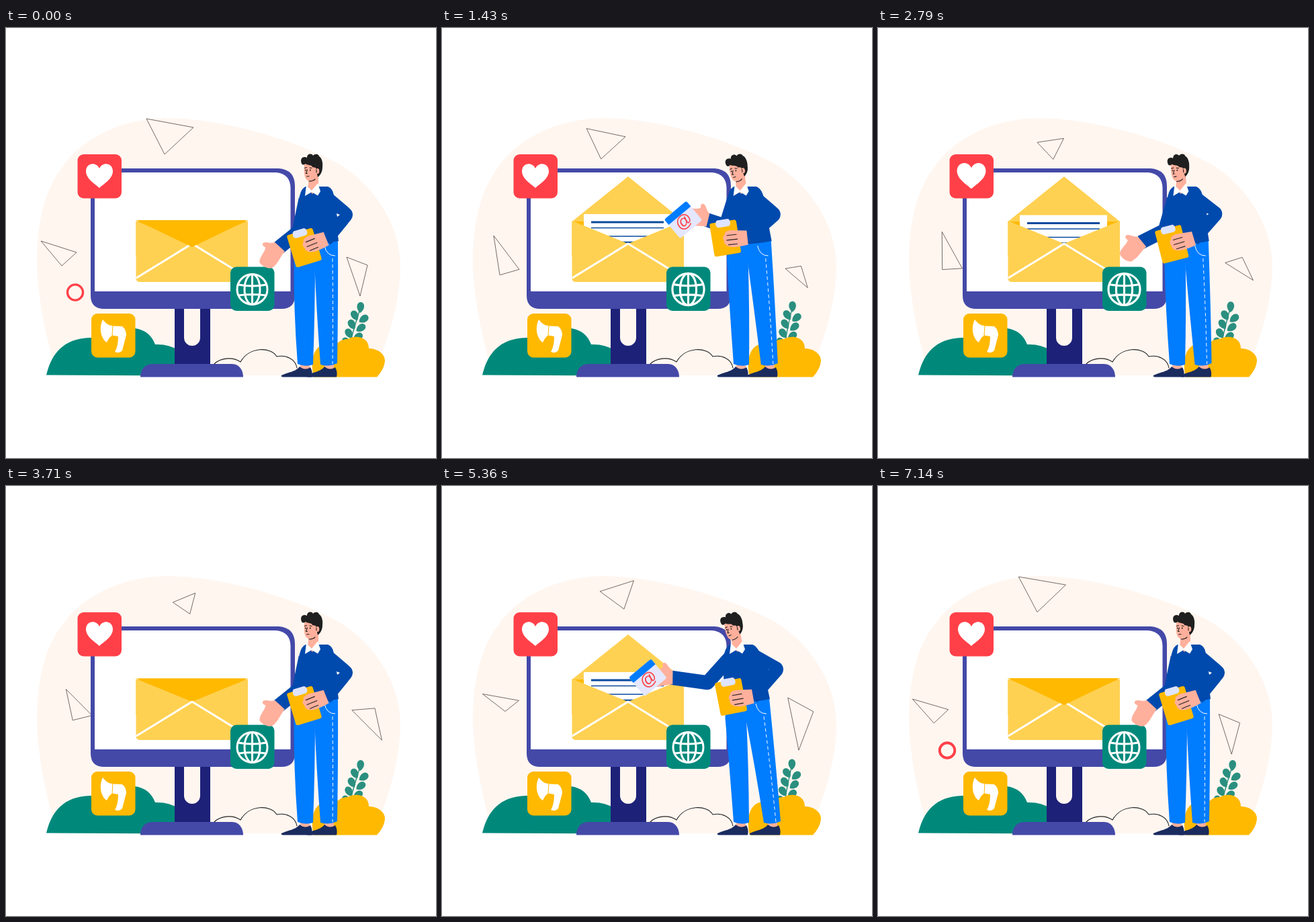
These frames come from a looping animation (640x640 px, 7210 ms). An HTML page:

```html
<!DOCTYPE html>
<html lang="en">
<head>
<meta charset="utf-8">
<title>Mail delivery</title>
<style>
  html, body { margin: 0; width: 100%; height: 100%; overflow: hidden; background: #fff; }
  svg { display: block; width: 100%; height: 100%; }
  .line { fill: none; stroke: #fff; stroke-width: 3; }
  .thin { stroke-width: 1; }
  .ink { fill: none; stroke: #222; stroke-width: 1.1; stroke-linecap: round; }
  .wire { fill: none; stroke: #55483f; stroke-width: .8; vector-effect: non-scaling-stroke; }
  .skin { fill: #ffb09c; }
  .gold { fill: #ffb900; }
  .pale { fill: #ffd152; }
  .teal { fill: #00897b; }
  .frame { fill: #4449a8; }
  .sweater { fill: #004aad; }
  .sleeve { fill: none; stroke: #004aad; stroke-linejoin: round; }
  .jeans { fill: #007cff; }
  .shoe { fill: #1a2b5e; }
  .at { font: 25px Arial, "Liberation Sans", sans-serif; fill: #ff4048; text-anchor: middle; }
</style>
</head>
<body>
<svg viewBox="0 0 640 640">
  <defs>
    <g id="cardShape">
      <rect x="-21.5" y="-18.5" width="43" height="37" rx="3" fill="#e4e7ff"/>
      <path d="M-21.5 -8V-15.5q0 -3 3 -3H18.5q3 0 3 3V-8Z" fill="#007cff"/>
      <text class="at" x="-1" y="10.500">@</text>
    </g>
    <path id="shoe" d="M410 517C420 512 431 512 437 504C443 509 449 508 453 505C456 510 456 516 455 519.500H412Q409 519 410 517Z"/>
    <path id="leaf" d="M0 -2C-8 -8 -6 -18 0 -18C6 -18 8 -8 0 -2Z"/>
  </defs>

  <path fill="#fff6f0" d="M75 517C66 480 46 410 46 345C46 290 58 240 83 208C115 160 180 133 245 134C330 136 440 170 500 205C560 245 587 305 587 355C587 410 566 475 545 517Z"/>
  <g id="triangles"></g>
  <path class="teal" d="M60 516.500C66 492 80 462 125 461Q145 461 155 466C160 450 180 446 192 447Q214 450 222 471Q244 470 258 481V517.500Z"/>
  <path class="ink" d="M310 500C318 492 336 488 349 497C362 474 394 474 403 489C417 486 431 493 433 506"/>
  <g id="plant" fill="#2a8f7f">
    <path d="M507 490Q515 455 527 418" fill="none" stroke="#2a8f7f" stroke-width="1.5"/>
  </g>
  <path class="gold" d="M458 519.500C452 495 458 471 478 470Q488 469 495 468C500 462 509 464 511 462C520 457 540 459 540 477C553 477 564 485 564 495Q563 508 552 519.500Z"/>

  <path fill="#1e2178" d="M251 416H304V501H251ZM265 416V461A12 12 0 0 0 289 461V416Z" fill-rule="evenodd"/>
  <path class="frame" d="M200 519.500C200 507 208 500 218 500H336C347 500 353 509 353 519.500Z"/>
  <path class="frame" d="M126 209H406Q430 211 430 235V398Q430 418 410 418H146Q126 418 126 398Z"/>
  <path fill="#fff" d="M132 215H402Q423 217 423.500 238V392H132Z"/>
  <g id="rings" fill="none"></g>

  <path id="flapBack" class="pale"/>
  <path class="gold" d="M193.500 288H360V340H193.500Z"/>
  <g id="letter">
    <rect x="211" y="277" width="130" height="46" fill="#fff"/>
    <path stroke="#0b4a9e" stroke-width="3" d="M222 289H330"/>
    <path stroke="#0b4a9e" stroke-width="1.6" d="M222 297.500H330M222 310H330"/>
    <path stroke="#0b4a9e" stroke-width="2.500" d="M222 319H330"/>
  </g>
  <use id="cardInside" href="#cardShape"/>
  <path class="pale" d="M193.500 287L277 321L360 287V372Q360 378 354 378H199.500Q193.500 378 193.500 372Z"/>
  <path class="line" d="M194 372L277 321L360 372"/>
  <path id="flapFront" class="gold"/>

  <rect x="106.500" y="188" width="65.500" height="65.500" rx="9" fill="#ff4048"/>
  <path id="heart" fill="#fff" d="M0 18C-8 11 -20 4 -20 -7C-20 -19 -5 -22 0 -11C5 -22 20 -19 20 -7C20 4 8 11 0 18Z"/>
  <rect class="gold" x="127" y="425" width="65.500" height="65.500" rx="9"/>
  <path fill="#fff" d="M144 434C149 440 153 443 158.500 443L157.500 458C154 460 152 464 150 468C141 462 138 446 144 434ZM159.500 443.500L173 444Q179 449 179 457L173 480Q169 485 162 482Q167 474 167 459L158.500 457.500Z"/>
  <rect class="teal" x="334" y="355.500" width="65.500" height="65.500" rx="9"/>
  <g id="globe" class="line">
    <circle r="22.500"/><ellipse rx="11.500" ry="22.500"/>
    <path d="M0 -22.500V22.500M-21 -7Q0 -3 21 -7M-21 9Q0 6 21 9"/>
  </g>

  <path id="backArm" class="sleeve" stroke-width="21"/>
  <path id="backHand" class="skin" d="M-2 -10V10C4 13 5 20 10 22Q15 22 13 15C17 12 22 12 26 11Q37 9 36 3C36 -6 32 -12 28 -13C18 -15 10 -11 -2 -10Z"/>
  <use id="cardHeld" href="#cardShape"/>
  <path class="skin" d="M438 498H452V506Q445 510 438 506Z"/>
  <use href="#shoe" class="shoe"/>
  <g id="rightFoot">
    <path class="skin" d="M474 496H488V506Q481 510 474 506Z"/>
    <use href="#shoe" class="shoe" x="37"/>
  </g>
  <path id="leftLeg" class="jeans"/>
  <path id="rightLeg" class="jeans"/>
  <path id="seam" class="line thin" stroke-dasharray="5 4"/>
  <path id="pocket" class="line thin"/>
  <path id="torso" class="sweater"/>
  <g id="chest">
    <g id="head">
      <path class="skin" d="M451 222L449 240L456 247L465 238L465 214Z"/>
      <path class="skin" d="M445 199C443 207 443 218 446 224C449 229 456 229 460 226L466 212V200Z"/>
      <path fill="#1f1f1f" d="M440 202C437 194 442 190 448 193C448 187 455 186 457 190C460 186 466 188 466 191C470 193 472 201 471 207C471 214 468 219 464 222L461 208L456 207C455 203 449 205 446 202Q442 205 440 202Z"/>
      <ellipse class="skin" cx="463.500" cy="213" rx="2.800" ry="4"/>
      <path class="ink" d="M444.500 208.500L447.500 207.500M452 208L455 208.500M448.500 211L446.500 216.500H448.500M447.500 221L451 220.500M451 228Q457 228 460 225M462 211V215"/>
      <path d="M445.200 210.500h1.600v2h-1.600ZM452 210.500h1.600v2h-1.600Z" fill="#222"/>
    </g>
    <path fill="#fff" d="M447 234L445 250L455 244L464 249.500L468 243L464 231L455 242Z"/>
  </g>
  <g id="clipboard">
    <rect class="gold" x="-20" y="-25" width="40" height="50" rx="3"/>
    <path fill="#dfe4ff" d="M-8 -28H8Q11 -27 11 -21Q10 -17 7 -17H-7Q-10 -17 -11 -21Q-11 -27 -8 -28Z"/>
  </g>
  <path id="frontArm" class="sleeve" stroke-width="24"/>
  <path id="armGap" fill="#fff" d="M-2 -2L3 0L-1 3Z"/>
  <g id="frontHand">
    <path class="skin" d="M3 -11L-20 -14Q-30 -14 -30 -9Q-35 -5 -32 0Q-33 6 -27 9Q-20 13 3 10Z"/>
    <path class="ink" d="M-13 -7H-27M-12 0H-28M-13 7H-26"/>
  </g>
</svg>

<script>
// One loop holds two deliveries.
const LOOP = 7210, DELIVERY = LOOP / 2, STEP = LOOP / 101, RELEASE = 2000;
const SVG = "http://www.w3.org/2000/svg";
const $ = id => document.getElementById(id);
const set = (el, attrs) => { for (const k in attrs) el.setAttribute(k, attrs[k]); return el; };
const add = (parent, tag, attrs) => $(parent).appendChild(set(document.createElementNS(SVG, tag), attrs));
const path = (id, d) => set($(id), { d });
const place = (id, x, y, turn = 0, size = 1) =>
  set($(id), { transform: `translate(${x} ${y}) rotate(${turn}) scale(${size})` });
const show = (el, on) => { el.style.display = on ? "" : "none"; };
const clamp = v => Math.min(1, Math.max(0, v));
const ramp = (t, a, b) => clamp((t - a) / (b - a));
const smooth = (t, a, b) => { const u = ramp(t, a, b); return u * u * (3 - 2 * u); };
const bump = (t, a, b) => Math.sin(Math.PI * ramp(t, a, b)) ** 2;
const mix = (a, b, u) => a.map((v, i) => v + (b[i] - v) * u);

// Wire triangles drift and turn on two slow waves, far and side.
// Each move gives x, y, turn and the two scales.
const triangles = [
  ["-32,-22 38,-9 -5,31", (far, side) =>
    [241 + 26 * far - 9 * side, 157 + 18 * far + 6 * side, 12 * side - 30 * far, 1 - .5 * far, 1 - .45 * far]],
  ["-28,-18 25,-1 3,19", (far, side) =>
    [80 + 26 * far + 4 * side, 335 - 3 * far + 12 * side, 30 * far + 20 * side, 1, 1 + .25 * side]],
  ["-17,-23 14,-11 3,35", (far, side) =>
    [524 + 17 * far, 364 - 16 * far + 8 * side, -28 * far - 22 * side, 1 - .3 * side, 1 - .3 * side]]
].map(([points, move]) => ({ move, el: add("triangles", "polygon", { class: "wire", points }) }));

function ring(start, stroke, cx, cy) {
  const el = add("rings", "circle", { cx, cy, stroke });
  return time => {
    const age = ((time - start + LOOP) % LOOP) / 800;
    const width = 6 * (1 - clamp(age));
    set(el, { r: Math.max(0, 13.2 * smooth(age, -.1, .3) - width / 2), "stroke-width": width });
    show(el, age < 1);
  };
}
const rings = [
  ring(6850, "#ff4048", 103, 393.5),
  ring(4440, "#0a4cab", 385, 423.5),
  ring(5380, "#ffcf70", 507, 219)
];

const leaf = (x, y, turn) =>
  add("plant", "use", { href: "#leaf", transform: `translate(${x} ${y}) rotate(${turn})` });
leaf(527, 426, 4);
for (let i = 0; i < 4; i++) {
  leaf(524 - 4.3 * i, 437 + 13.3 * i, -28);
  leaf(524 - 4.3 * i, 439 + 13.3 * i, 55);
}

// Reaching arm: elbow, wrist and hand angle at its three stops.
const arm = {
  rest: [436, 303, 406, 327, 132],
  tuck: [440, 296, 428, 303, 170],
  reach: [385, 292, 322, 282, 182]
};
function reachingArm(t) {
  const out = mix(mix(arm.rest, arm.tuck, smooth(t, 200, 1000)), arm.reach, smooth(t, 1080, RELEASE));
  const pose = mix(out, arm.rest, smooth(t, 2050, 3050));
  const lift = bump(t, 1105, 1800);
  pose[3] -= 11 * lift;
  pose[4] += 20 * lift;
  return pose;
}

function drawCard(t) {
  const [, , x, y] = reachingArm(Math.min(t, RELEASE));
  const turn = smooth(t, 1105, 1430), fall = ramp(t, RELEASE, 2760);
  const card = [x - 24 - 11 * turn - 8 * smooth(t, RELEASE, 2400), y + 9 - 9 * turn + 65 * fall * fall, 56 * turn - 96];
  place("cardHeld", ...card);
  place("cardInside", ...card);
  show($("cardHeld"), t >= 1000 && t < RELEASE);
  show($("cardInside"), t >= RELEASE && fall < 1);
}

function drawMan(t) {
  const tuck = smooth(t, 200, 1000) - smooth(t, 2350, 3100);
  const lean = smooth(t, 1050, 1700) - smooth(t, 2350, 3050);
  const chest = -2 * tuck - 15 * lean, hip = -7 * lean, foot = 11 * lean;

  const [elbowX, elbowY, wristX, wristY, hand] = reachingArm(t);
  path("backArm", `M${446 + chest} 255L${elbowX} ${elbowY}L${wristX} ${wristY}`);
  place("backHand", wristX, wristY, hand);

  path("leftLeg", `M${430 + hip} 315H${470 + hip}L${460 + hip} 346Q${460 + hip * .5} 420 457 501Q446 505 434 500Q428 420 ${428.5 + hip} 345Z`);
  path("rightLeg", `M${440 + hip} 315H${494 + hip}Q${494.5 + foot * .2} 410 ${493 + foot} 499Q${480 + foot} 505 ${468 + foot} 501Q${462 + foot * .4} 420 ${459 + hip} 346Z`);
  path("seam", `M${486 + hip} 343Q${487 + foot * .2} 420 ${486 + foot} 500`);
  path("pocket", `M${474 + hip} 324Q${477 + hip} 339 ${490 + hip} 339`);
  place("rightFoot", foot, 0);
  path("torso", `M${446 + chest} 236Q${440 + chest} 238 ${437 + chest} 250Q${429 + chest * .7} 285 ${429 + hip} 320Q${463 + hip} 324 ${495 + hip} 317L${488 + chest * .7} 262Q${490 + chest} 240 ${479 + chest} 236Z`);
  place("chest", chest, 0);
  set($("head"), { transform: `rotate(${-4 * tuck - 7 * lean} 456 240)` });

  const boardX = 444 - 36 * tuck + 22 * lean, boardY = 327 - 16 * tuck + 3 * lean;
  const tilt = 11 * tuck - 5 * lean - 17;
  const flare = 26 * lean - 17 * tuck;
  const frontX = 504 + chest + flare, frontY = 278 + 7 * tuck - 12 * lean;
  const gripX = boardX + 30, gripY = boardY - 12 * (1 - tuck);
  place("clipboard", boardX, boardY, tilt);
  path("frontArm", `M${469 + chest} 248L${frontX} ${frontY}L${gripX} ${gripY}`);
  place("armGap", frontX - 10, frontY, 0, clamp((frontX - 494) / 10));
  place("frontHand", gripX, gripY, (tilt + 6) * 2);
}

function drawEnvelope(t) {
  const open = smooth(t, 0, 700) - smooth(t, 2900, 3500);
  const tip = 326 - 105 * open, raised = tip < 287;
  const hinge = raised ? 288 : 286 + 4 * open;
  const flap = `M193.500 ${hinge}L277 ${tip}L360 ${hinge}Z`;
  path("flapBack", flap);
  path("flapFront", flap);
  show($("flapBack"), raised);
  show($("flapFront"), !raised);
  place("letter", 0, 47 * (1 - smooth(t, 450, 1000) + smooth(t, 2740, 3150)));
}

function draw(time) {
  const t = time % DELIVERY, angle = 2 * Math.PI * time / LOOP;
  for (const { move, el } of triangles) {
    const [x, y, turn, sx, sy] = move((1 - Math.cos(angle)) / 2, Math.sin(angle));
    set(el, { transform: `translate(${x} ${y}) scale(${sx} ${sy}) rotate(${turn})` });
  }
  rings.forEach(drawRing => drawRing(time));
  set($("plant"), { transform: `rotate(${2.6 * (Math.cos(2 * angle) - 1)} 508 490)` });
  place("heart", 139, 220, 0, 1 + .1 * bump(t, 1800, 3250));
  place("globe", 366.5, 389, 0, 1 + .1 * bump(t, 600, 1700) + .05 * bump(t, 2500, 3200));
  drawEnvelope(t);
  drawCard(t);
  drawMan(t);
}

const begin = performance.now();
function tick() {
  const time = (performance.now() - begin) % LOOP;
  draw(Math.floor((time + 3) / STEP) % 101 * STEP);
  requestAnimationFrame(tick);
}
tick();
</script>
</body>
</html>
```
